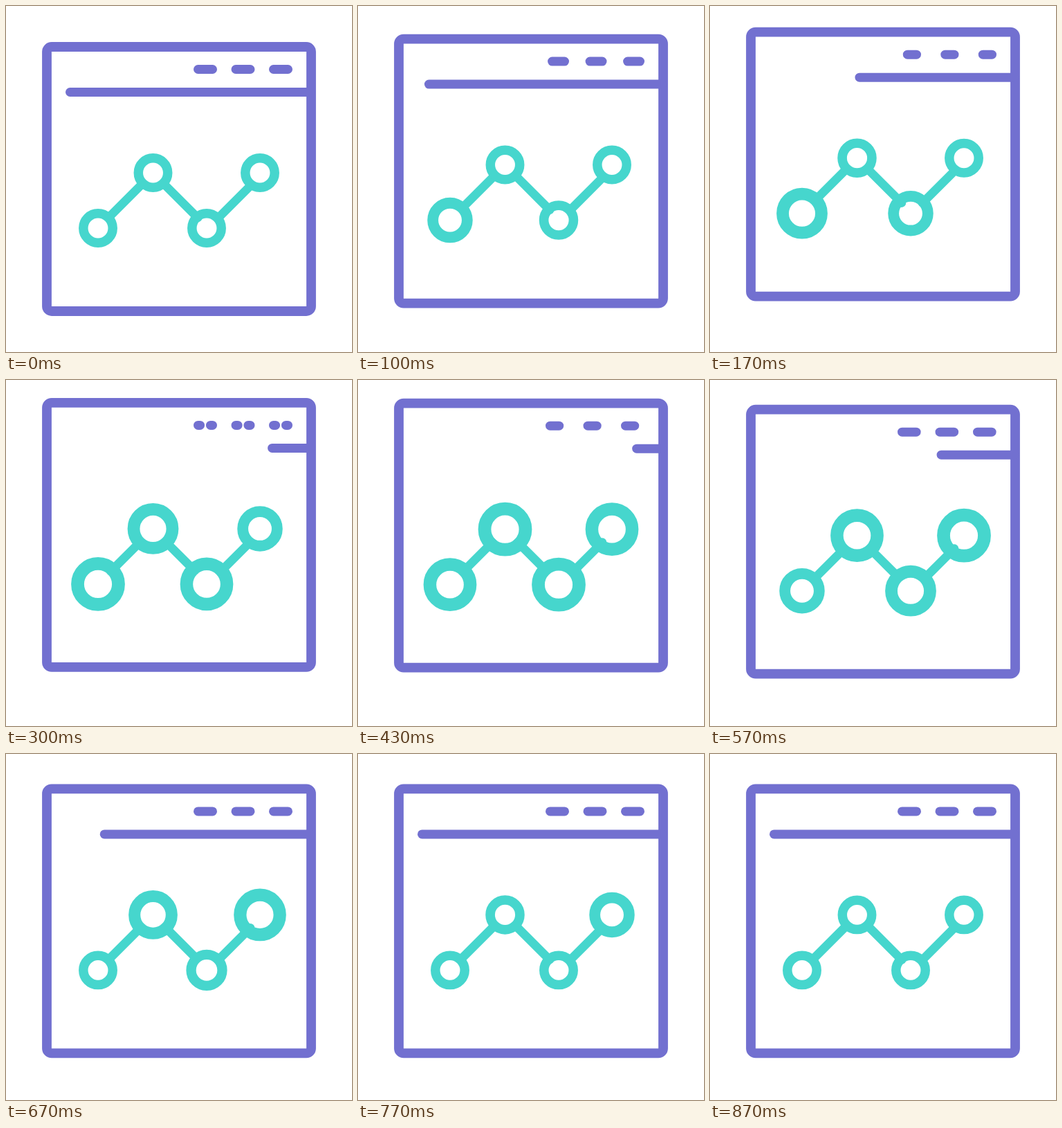
Animation of 500x500 px, one loop 1530 ms. Source, as an HTML page:

```html
<!DOCTYPE html>
<html lang="en">
<head>
<meta charset="utf-8">
<title>Chart window</title>
<style>
  html, body { margin: 0; width: 100%; height: 100%; overflow: hidden; background: #fff; }
  svg { display: block; width: 100%; height: 100%; }
  .frame { fill: none; stroke: #7270d0; stroke-linecap: round; }
  .chart { fill: none; stroke: #46d6cd; stroke-linecap: round; }
</style>
</head>
<body>
<svg viewBox="0 0 500 500">
  <g id="window">
    <g class="frame" stroke-width="13">
      <rect x="59" y="59" width="382" height="382" rx="7" stroke-width="13.8"/>
      <path id="rule"/>
      <path id="dashes"/>
    </g>
    <g class="chart">
      <path id="links" stroke-width="12.5"/>
      <g id="rings" stroke-width="13.5"></g>
    </g>
  </g>
</svg>
<script>
const LOOP = 1530, STEP = 100 / 3, LAST = 26;
const HALF = 10 * STEP;   // time to rise, and to fall again
const LAG = 2 * STEP;     // delay between neighbouring parts
const TOP = 26.2, REST = 8.6;
const DASH = 21, LINK = 79.5;

const $ = id => document.getElementById(id);
const clamp = x => Math.min(1, Math.max(0, x));

// cubic-bezier(x1, 0, x2, 1), solved by bisection
const bezier = (x1, x2) => x => {
  x = clamp(x);
  let lo = 0, hi = 1;
  for (let i = 0; i < 24; i++) {
    const s = (lo + hi) / 2, r = 1 - s;
    if (3 * r * r * s * x1 + 3 * r * s * s * x2 + s * s * s < x) lo = s;
    else hi = s;
  }
  return lo * lo * (3 - 2 * lo);
};

// Rise, then fall along the mirrored curve
const pulse = ease => t => ease(Math.min(t, 2 * HALF - t) / HALF);
const swell = pulse(bezier(.4, .125));
const slide = pulse(bezier(.36, .22));
const sine = x => (1 - Math.cos(Math.PI * clamp(x))) / 2;

const nodes = [
  { x: 133, y: 321, delay: 0 },
  { x: 212.5, y: 241, delay: 2 * LAG },
  { x: 290, y: 321, delay: LAG },
  { x: 367, y: 241, delay: 3 * LAG }
];
for (const node of nodes) {
  node.el = document.createElementNS("http://www.w3.org/2000/svg", "circle");
  node.el.setAttribute("r", 21.2);
  $("rings").append(node.el);
}

// Each dash leaves to the right while its successor grows in from the left
function dashPath(t) {
  const tail = DASH * sine(t / 400), head = DASH * sine((t - 200) / 400);
  let d = "";
  for (let i = 0; i < 3; i++) {
    const x = 277.5 + i * 54.5;
    if (tail < DASH) d += `M${x + tail} 91.5H${x + DASH}`;
    if (head > 0) d += `M${x} 91.5H${x + head}`;
  }
  return d;
}

// A regular zigzag at 45 degrees, cut short of each ring's centre
function linkPath(t) {
  const gap = i => (i === 2 ? 21 + 8 * swell(t - 2 * LAG) : 26) * Math.SQRT1_2;
  let d = "";
  for (let i = 0; i < 3; i++) {
    const x = 133 + i * LINK, up = i % 2 === 0;
    const point = k => `${x + k} ${up ? 321 - k : 321 - LINK + k}`;
    d += `M${point(gap(i))}L${point(LINK - gap(i + 1))}`;
  }
  return d;
}

function draw(t) {
  const lift = t < HALF ? TOP * swell(t) : REST + (TOP - REST) * swell(t);
  $("window").setAttribute("transform", `translate(0 ${-lift})`);
  $("rule").setAttribute("d", `M${92.5 + 312 * slide(t - LAG)} 124.5H440`);
  $("dashes").setAttribute("d", dashPath(t));
  $("links").setAttribute("d", linkPath(t));
  for (const { el, x, y, delay } of nodes) {
    const scale = 1 + .393 * swell(t - delay);
    el.setAttribute("transform", `translate(${x} ${y}) scale(${scale})`);
  }
}

// The picture advances 30 times a second, on a 10 ms clock
function tick(now) {
  const t = Math.floor((now - start) % LOOP / 10) * 10;
  draw(Math.min(LAST, Math.floor((t + 5) / STEP)) * STEP);
  requestAnimationFrame(tick);
}

const start = performance.now();
draw(0);
requestAnimationFrame(now => tick(Math.max(now, start)));
</script>
</body>
</html>
```
